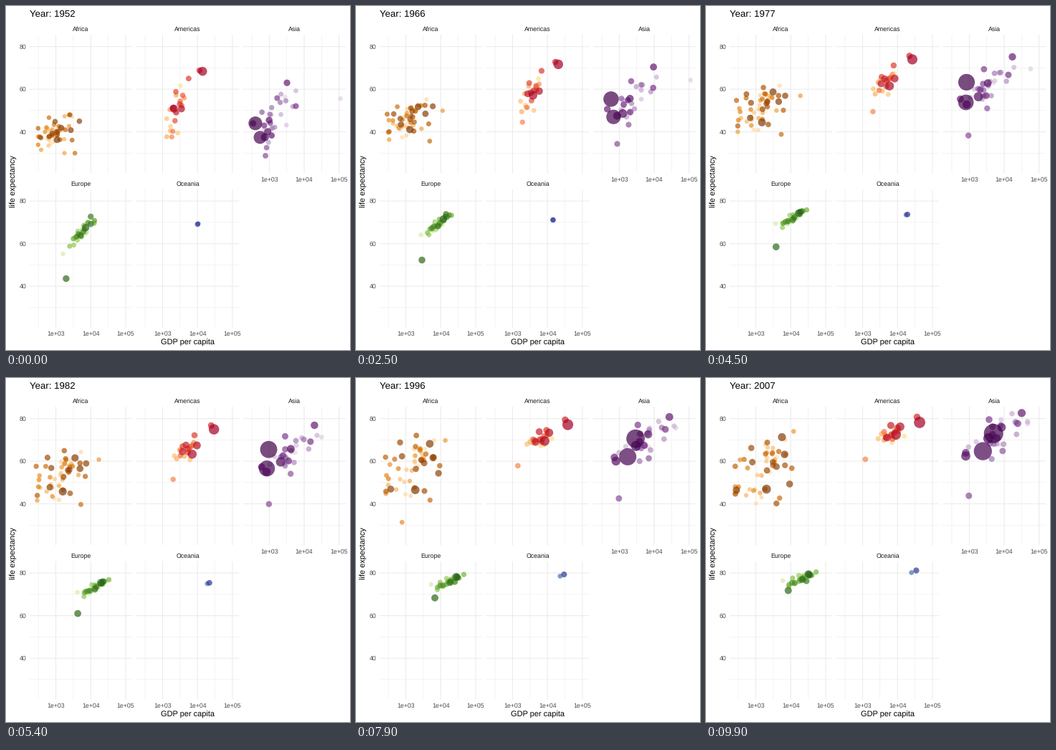
Write a matplotlib script that moves like this. It is 480 px wide and 480 px high and loops after 10 s.

```python
import numpy as np
import matplotlib.pyplot as plt
from matplotlib.animation import FuncAnimation

SIZE, FRAMES, INTERVAL = 480, 100, 100
FIRST, LAST = 1952, 2007
PANEL_W, PANEL_H = 143.4, 193.1


def ease(year):
    """Progress from 0 to 1, quicker in the early decades."""
    t = (np.asarray(year) - FIRST) / (LAST - FIRST)
    return 1 - (1 - t) ** 1.4


def radius(pop):
    size = 2 + 10 * np.sqrt(pop / 1319)
    return 0.375 * (2.845 * size + 0.945) + 0.35


def populations(n, head):
    """Leading populations in millions, then a steady falling tail."""
    k = np.arange(n - len(head) + 1)
    tail = head[-1] * (1 + k) ** -0.5 * np.exp(-0.07 * k)
    return np.r_[head[:-1], tail]


def ramp(codes, n):
    stops = np.array([[int(c[i:i + 2], 16) / 255 for i in (0, 2, 4)]
                      for c in codes.split()])
    at = np.linspace(0, len(stops) - 1, n)
    return np.column_stack([np.interp(at, range(len(stops)), s) for s in stops.T])


class Facet:
    """One continent: a seeded cloud of countries, the largest ranked first.

    gdp and life give mean and spread at the start, then at the end.
    keys holds the paths of a few leading or outlying countries by rank.
    """

    def __init__(self, name, col, row, n, head, growth, colors, gdp, life,
                 tie, keys, setback=0, seed=1):
        self.name = name
        self.left, self.top = 32.9 + col * 148.9, 40.1 + row * 215.5
        self.pop, self.growth = populations(n, head), growth
        self.colors = ramp(colors, n)
        self.keys = keys

        rng = np.random.default_rng(seed)

        def linked(z, amount):
            noise = rng.normal(size=n)
            return np.clip(amount * z + np.sqrt(1 - amount ** 2) * noise, -1.8, 1.8)

        rich0 = linked(np.zeros(n), 0)
        rich1 = linked(rich0, 0.8)
        self.gdp = gdp[0] + gdp[1] * rich0, gdp[2] + gdp[3] * rich1
        self.life = (life[0] + life[1] * linked(rich0, tie),
                     life[2] + life[3] * linked(rich1, tie))
        self.setback = setback * rng.random(n)

    def x(self, log_gdp):
        return self.left + (np.asarray(log_gdp) - 2.2485) * 48.75

    def y(self, life):
        return self.top + (85.55 - np.asarray(life)) * 2.975

    def state(self, year):
        """Centres and radii of all bubbles, the smallest country first."""
        t, e = (year - FIRST) / (LAST - FIRST), ease(year)
        gdp = self.gdp[0] + (self.gdp[1] - self.gdp[0]) * e
        life = self.life[0] + (self.life[1] - self.life[0]) * e
        life += self.setback * np.sin(np.pi * t ** 2)
        for rank, path in self.keys.items():
            years, g, l = np.array(path).T
            gdp[rank] = np.interp(e, ease(years), np.log10(g))
            life[rank] = np.interp(e, ease(years), l)
        pop = self.pop * (1 + (self.growth - 1) * t) / self.growth
        xy = np.column_stack([self.x(gdp), self.y(life)])
        return xy[::-1], radius(pop)[::-1]


facets = [
    Facet("Africa", 0, 0, 52, [135], 3.9, "7F3B08 B35806 E08214 FDB863 FEE0B6",
          (2.98, 0.27, 3.22, 0.45), (39, 5, 55.5, 8.5), 0.5, {
              0: [(1952, 1077, 36.3), (1982, 1577, 45.8), (2007, 2014, 46.9)],
              1: [(1952, 1419, 41.9), (2007, 5581, 71.3)],
              3: [(1952, 781, 39.1), (1982, 674, 47.8), (2007, 278, 46.5)],
              4: [(1952, 4725, 45), (1987, 7826, 60.8), (2007, 9270, 49.3)],
              19: [(1952, 3521, 30), (1972, 5473, 37.9), (2007, 4797, 42.7)],
              28: [(1952, 493, 40), (1987, 848, 44), (1992, 737, 23.6),
                   (2007, 863, 46.2)],
              31: [(1952, 2388, 42.7), (1972, 21011, 52.8), (2007, 12057, 74)],
          }, setback=7, seed=4),
    Facet("Americas", 1, 0, 25, [301, 190, 109], 2.2,
          "A50026 D73027 F46D43 FDAE61 FEE090",
          (3.48, 0.2, 3.88, 0.24), (53, 8.5, 73.6, 3.6), 0.7, {
              0: [(1952, 13990, 68.4), (2007, 42952, 78.2)],
              1: [(1952, 2109, 50.9), (1982, 7031, 63.3), (2007, 9066, 72.4)],
              2: [(1952, 3478, 50.8), (1982, 9611, 67.4), (2007, 11978, 76.2)],
              5: [(1952, 11367, 68.8), (2007, 36319, 80.7)],
              14: [(1952, 1840, 37.6), (1982, 2011, 51.5), (2007, 1202, 60.9)],
          }, seed=7),
    Facet("Asia", 2, 0, 33, [1319, 1110, 224], 2.5,
          "40004B 762A83 9970AB C2A5CF E7D4E8",
          (3.15, 0.34, 3.8, 0.5), (46.5, 8.5, 71.5, 6), 0.75, {
              0: [(1952, 400, 44), (1962, 488, 44.5), (1967, 613, 58.4),
                  (1982, 962, 65.5), (2007, 4959, 73)],
              1: [(1952, 547, 37.4), (1982, 856, 56.6), (2007, 2452, 64.7)],
              2: [(1952, 750, 37.5), (2007, 3541, 70.7)],
              5: [(1952, 3217, 63), (1972, 14779, 73.4), (2007, 31656, 82.6)],
              12: [(1952, 779, 28.8), (1982, 978, 39.9), (2007, 975, 43.8)],
              31: [(1952, 108382, 55.6), (1972, 109348, 67.7),
                   (1982, 31354, 71.3), (2007, 47307, 77.6)],
          }, seed=3),
    Facet("Europe", 0, 1, 30, [82], 1.35, "276419 4D9221 7FBC41 B8E186 E6F5D0",
          (3.76, 0.21, 4.38, 0.24), (66, 4, 78, 2.4), 0.85, {
              0: [(1952, 7144, 67.5), (2007, 32170, 79.4)],
              1: [(1952, 1969, 43.6), (1982, 4241, 61), (2007, 8458, 71.8)],
              3: [(1952, 9980, 69.2), (2007, 33203, 79.4)],
              26: [(1952, 1601, 55.2), (1972, 3313, 67.7), (2007, 5937, 76.4)],
          }, seed=5),
    Facet("Oceania", 1, 1, 2, [20.4, 4.1], 2.3, "313695 4575B4",
          (4, 0, 4.5, 0), (69, 0, 81, 0), 0.5, {
              0: [(1952, 10040, 69.1), (1972, 16789, 71.9), (2007, 34435, 81.2)],
              1: [(1952, 10557, 69.4), (1972, 16046, 71.9), (2007, 25185, 80.2)],
          }),
]

plt.rcParams["font.family"] = "Liberation Sans"
plt.rcParams["text.hinting"] = "none"
fig = plt.figure(figsize=(SIZE / 72, SIZE / 72), dpi=72, facecolor="white")
ax = fig.add_axes([0, 0, 1, 1])
ax.set(xlim=(0, SIZE), ylim=(SIZE, 0))
ax.axis("off")


def label(x, y, text, size=8.8, color="#4D4D4D", **kw):
    return ax.text(x, y, text, fontsize=size, color=color, va="baseline", **kw)


def grid(facet, xs, ys, width):
    right, bottom = facet.left + PANEL_W, facet.top + PANEL_H
    style = dict(color="#EBEBEB", lw=width, snap=False, zorder=1,
                 solid_capstyle="butt")
    for x in facet.x(xs):
        ax.plot([x, x], [facet.top, bottom], **style)
    for y in facet.y(ys):
        ax.plot([facet.left, right], [y, y], **style)


bubbles = []
for f in facets:
    grid(f, [2.5, 3.5, 4.5], [30, 50, 70], 0.53)
    grid(f, [3, 4, 5], [40, 60, 80], 1.07)
    label(f.left + PANEL_W / 2, f.top - 4.9, f.name, color="#1A1A1A", ha="center")
    if f.name in ("Africa", "Europe"):
        for v in (40, 60, 80):
            label(28.1, f.y(v) + 3.2, str(v), ha="right")
    if f.name in ("Asia", "Europe", "Oceania"):
        for e in (3, 4, 5):
            label(f.x(e), f.top + PANEL_H + 11.3, f"1e+0{e}", ha="center")
    xy, r = f.state(FIRST)
    bubbles.append(ax.scatter(*xy.T, s=(2 * r) ** 2, c=f.colors[::-1], alpha=0.7,
                              linewidths=0, zorder=2))

title = label(33, 15, "", 13.2, "black")
label(253.8, 473, "GDP per capita", 11, "black", ha="center")
label(14, 244.5, "life expectancy", 11, "black", ha="center",
      rotation=90, rotation_mode="anchor")


def update(i):
    year = FIRST + (LAST - FIRST) * i / (FRAMES - 1)
    title.set_text(f"Year: {round(year)}")
    for f, dots in zip(facets, bubbles):
        xy, r = f.state(year)
        dots.set_offsets(xy)
        dots.set_sizes((2 * r) ** 2)
    return [title, *bubbles]


anim = FuncAnimation(fig, update, frames=FRAMES, interval=INTERVAL,
                     repeat=True, repeat_delay=0, blit=False)
plt.show()
```
